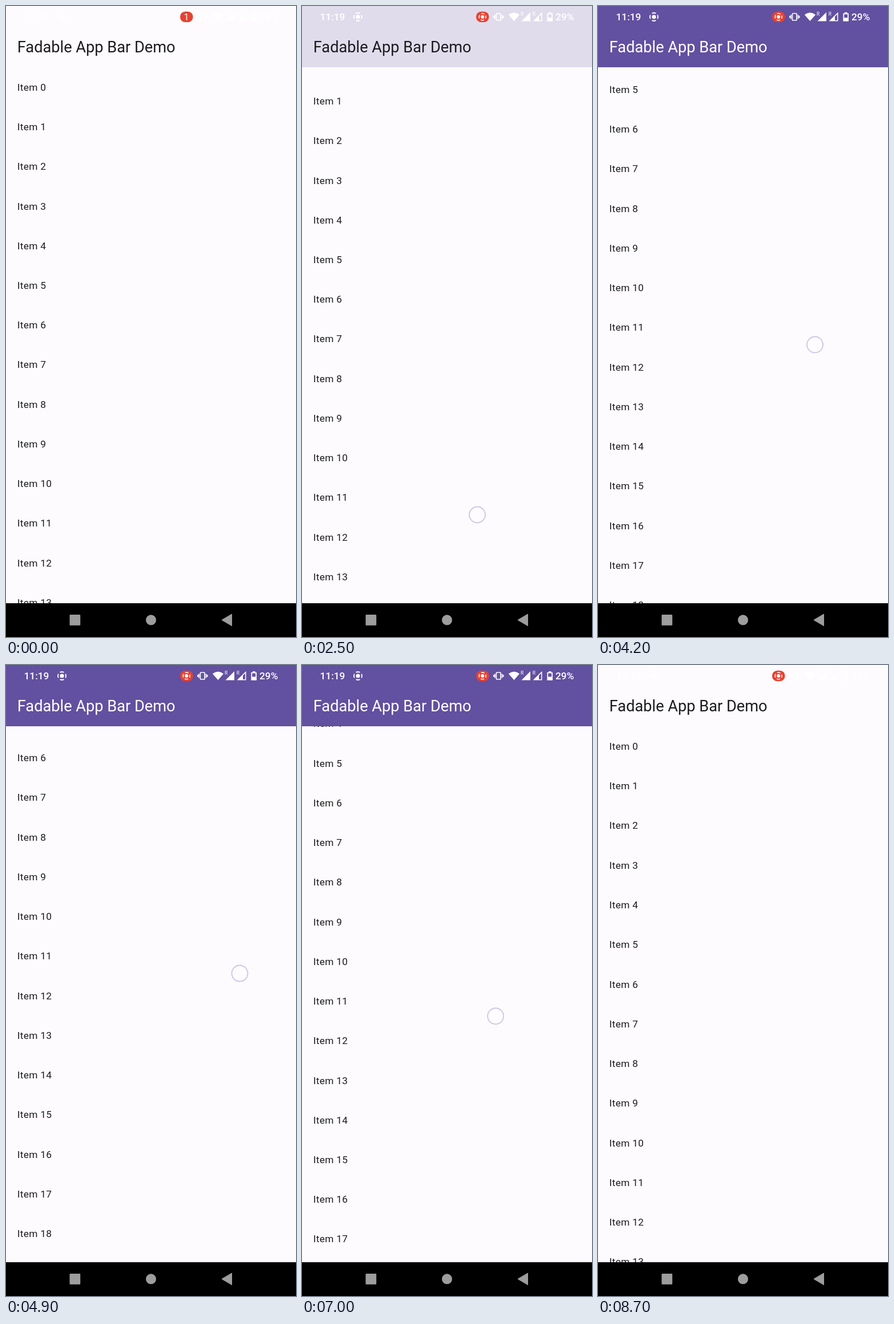
An HTML page that plays this animation: 508x1102 px, repeating every 8.8 s.

```html
<!DOCTYPE html>
<html lang="en">
<head>
<meta charset="utf-8">
<title>Fadable App Bar Demo</title>
<style>
  html, body { margin: 0; width: 100%; height: 100%; overflow: hidden; background: #fdfbfd; }
  svg { display: block; width: 508px; height: 1102px; font-family: Roboto, sans-serif; }
  .item { font-size: 17.3px; letter-spacing: .31px; fill: #1c1b1e; }
  .status { font-size: 17.3px; font-weight: 500; }
</style>
</head>
<body>
<svg viewBox="0 0 508 1102">
  <defs>
    <clipPath id="listArea"><rect y="107" width="508" height="936"/></clipPath>
    <g id="record" fill="none" stroke="#fff" stroke-width="1.8">
      <circle r="3.6" fill="#fff" stroke="none"/>
      <circle r="7" pathLength="8" stroke-dasharray="1.3 .7" stroke-dashoffset=".65"/>
    </g>
  </defs>
  <rect width="508" height="1102" fill="#fdfbfd"/>
  <g id="list" clip-path="url(#listArea)"></g>
  <rect id="bar" width="508" height="107"/>
  <text id="title" x="19.8" y="81.3" font-size="27.2">Fadable App Bar Demo</text>

  <g fill="#fff">
    <text class="status" x="31.5" y="25.3">11:19</text>
    <use href="#record" x="98" y="19"/>
    <rect x="305" y="9.7" width="22.5" height="18.6" rx="9" fill="#e64232"/>
    <use id="chipIcon" href="#record" transform="translate(316.2 19) scale(.85)"/>
    <text id="chipCount" x="316" y="24.6" font-size="16" text-anchor="middle">1</text>
    <g fill="none" stroke="#fff" stroke-width="1.7">
      <rect x="340.4" y="13" width="7.6" height="12" rx="1"/>
      <path d="M338 15.5v7M350.5 15.5v7M335.9 17v4M352.6 17v4"/>
    </g>
    <path d="M361.8 15.2Q371.5 8 381 15.2L371.4 26.3Z"/>
    <path d="M384.5 26.5L400 11V26.5Z"/>
    <path fill-rule="evenodd" d="M404.5 26.5L420.5 10.8V26.5ZM415 18.5V25H419V14.5Z"/>
    <text x="383" y="17" font-size="8.5">R</text>
    <text x="403.7" y="17" font-size="8.5">R</text>
    <path fill-rule="evenodd" d="M432 11h4.5v1.7h2.5v14h-9.6v-14h2.6ZM431.2 14.6v6h6v-6Z"/>
    <text class="status" x="444" y="25.3">29%</text>
  </g>

  <circle id="touch" r="14" fill="#fff" fill-opacity=".35" stroke="#cdc8e6" stroke-width="1.9"/>

  <rect y="1043" width="508" height="59"/>
  <g fill="#9d9d9d">
    <rect x="111.5" y="1063" width="18.7" height="18.7" rx="1"/>
    <circle cx="254" cy="1072.3" r="9"/>
    <path d="M378 1072.3L395.5 1062V1082.6Z" stroke="#9d9d9d" stroke-linejoin="round"/>
  </g>
</svg>
<script>
const LOOP = 8800, STEP = 100;
const BAR_BOTTOM = 107, ROW = 69.23, FADE_DISTANCE = 250;
const SURFACE = [253, 251, 253], PRIMARY = [98, 80, 160];
const $ = id => document.getElementById(id);

const scrollKeys = [[1700, 0], [2500, 45], [3300, 222.7], [4200, 342], [5000, 399], [5600, 412.5],
                    [6600, 412.5], [7500, 132.5], [8350, 0]];
const stretchKeys = [[8200, 0], [8400, .004], [8700, .0007]];
const drags = [
  { from: 1600, to: 5900, base: 933.5, x: [[1600, 312], [2500, 307], [3300, 321], [4200, 380], [5600, 424]] },
  { from: 6600, to: 8500, base: 929.5, x: [[6600, 350], [7500, 324], [8400, 354]] }
];

// Monotone cubic through [time, value] keys, held at both ends.
function track(keys, t) {
  const last = keys.length - 1;
  if (t <= keys[0][0]) return keys[0][1];
  if (t >= keys[last][0]) return keys[last][1];
  const slope = i => (keys[i + 1][1] - keys[i][1]) / (keys[i + 1][0] - keys[i][0]);
  const tangent = i => {
    if (i === 0 || i === last) return 0;
    const a = slope(i - 1), b = slope(i);
    return a * b > 0 ? 2 * a * b / (a + b) : 0;
  };
  const i = keys.findIndex(k => k[0] > t) - 1;
  const [t0, v0] = keys[i], [t1, v1] = keys[i + 1];
  const d = t1 - t0, u = (t - t0) / d, w = 1 - u;
  return v0 * (1 + 2 * u) * w * w + d * tangent(i) * u * w * w
       + v1 * u * u * (3 - 2 * u) - d * tangent(i + 1) * u * u * w;
}

const rows = Array.from({ length: 21 }, (_, i) => {
  const row = document.createElementNS('http://www.w3.org/2000/svg', 'text');
  row.setAttribute('class', 'item');
  row.setAttribute('x', 19.8);
  row.textContent = 'Item ' + i;
  return $('list').appendChild(row);
});

function draw(t) {
  const scroll = track(scrollKeys, t);
  const stretch = 1 + track(stretchKeys, t);
  rows.forEach((row, i) => {
    const center = (i + .5) * ROW - scroll;
    row.setAttribute('y', (BAR_BOTTOM + center * stretch + 6.2).toFixed(2));
  });

  const fade = Math.min(1, scroll / FADE_DISTANCE);
  const color = SURFACE.map((c, i) => Math.round(c + (PRIMARY[i] - c) * fade));
  $('bar').setAttribute('fill', `rgb(${color})`);
  $('title').setAttribute('fill', fade < 1 ? '#1c1b1e' : '#fff');

  const counting = t < 100;
  $('chipCount').style.display = counting ? '' : 'none';
  $('chipIcon').style.display = counting ? 'none' : '';

  const drag = drags.find(d => t >= d.from && t < d.to);
  $('touch').style.display = drag ? '' : 'none';
  if (drag) {
    $('touch').setAttribute('cx', track(drag.x, t));
    $('touch').setAttribute('cy', drag.base - scroll);
  }
}

const start = performance.now();
function tick() {
  const t = (performance.now() - start) % LOOP;
  draw(Math.floor(t / STEP) * STEP);
  requestAnimationFrame(tick);
}
tick();
</script>
</body>
</html>
```
